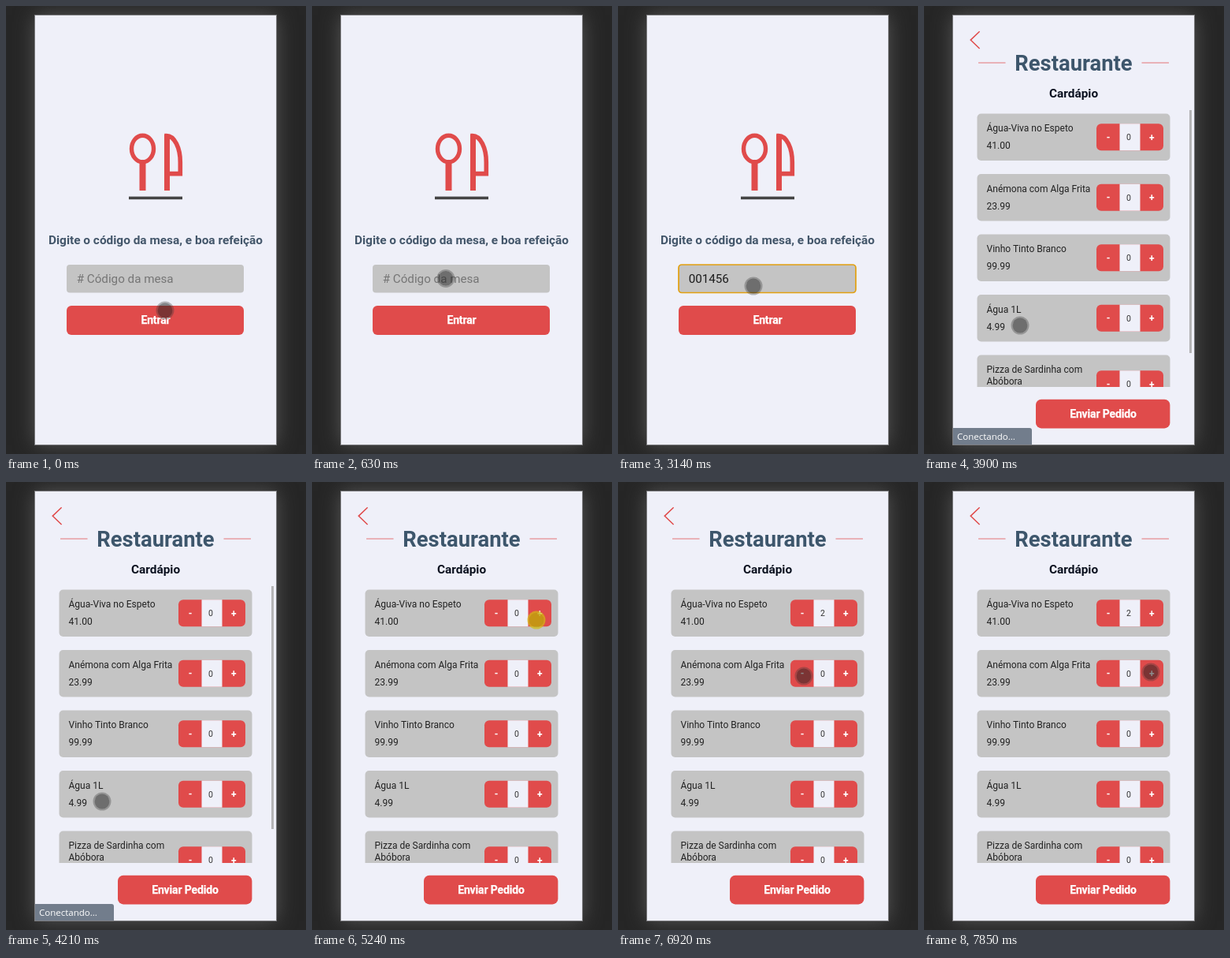
Write an HTML page that moves like this. It is 381x568 px and loops after 8 s.

```html
<!DOCTYPE html>
<html lang="pt">
<head>
<meta charset="utf-8">
<style>
  html, body { margin: 0; width: 100%; height: 100%; overflow: hidden; background: #262626; }
  #phone { position: absolute; left: 37px; top: 12px; width: 306px; height: 544px;
           background: #eff0f9; box-shadow: 0 0 0 1px #7d7d80, 0 0 24px #585858; }
  svg { position: absolute; left: 0; top: 0; font-family: Roboto, sans-serif; }
  .red { fill: #e04b4b; }
  .line { fill: none; stroke: #e04b4b; }
  .bold { font-weight: 700; }
  .mid { text-anchor: middle; }
  .btn { fill: #fff; stroke: #fff; stroke-width: .25; font-size: 14px; letter-spacing: -.15px; }
  .sign { fill: #fff; font-size: 12px; }
  .item { fill: #222; font-size: 12px; }
  .qty { fill: #333; font-size: 10.5px; }
  .entry { font-size: 15.2px; }
</style>
</head>
<body>
<div id="phone"></div>
<svg width="381" height="568" viewBox="0 0 381 568">
  <g id="login">
    <g class="line" stroke-width="5.4">
      <ellipse cx="173.5" cy="181" rx="14" ry="16.8"/>
      <path d="M173.5 198V234" stroke-width="8"/>
      <path d="M204 234V164.600C214 164.600 221.300 180 221.300 198V212.600H206" stroke-width="5.6"/>
      <path d="M204.500 163V234" stroke-width="7"/>
    </g>
    <rect x="156" y="241.6" width="68" height="3.6" fill="#444"/>
    <text class="bold mid" x="190" y="302" font-size="15.4" fill="#43566a">Digite o código da mesa, e boa refeição</text>
    <rect id="field" x="77" y="328" width="225" height="35.5" rx="4" fill="#c4c4c4" stroke-width="1.7"/>
    <text id="entry" class="entry" x="89.7" y="351"></text>
    <rect id="caret" y="337" width="1" height="17" fill="#222"/>
    <rect class="red" x="77" y="380" width="225" height="37" rx="6"/>
    <text class="btn bold mid" x="190" y="403">Entrar</text>
  </g>
  <g id="menu">
    <path class="line" stroke-width="1.5" d="M70.6 32.3L59.2 43.1L70.6 54"/>
    <path class="line" stroke-width="1.2" opacity=".75" d="M69 72H103.5M276.5 72H311"/>
    <text class="bold mid" x="190" y="82.4" font-size="27.4" fill="#3d566c">Restaurante</text>
    <text class="bold mid" x="190" y="116" font-size="15.4" fill="#0c1220">Cardápio</text>
    <clipPath id="view"><rect x="37" y="132" width="306" height="351"/></clipPath>
    <g id="list" clip-path="url(#view)"></g>
    <rect id="bar" x="337" y="132" width="3" height="308" fill="#b4b4b6"/>
    <rect class="red" x="142" y="498.8" width="170.4" height="36.6" rx="7"/>
    <text class="btn bold mid" x="227.5" y="522">Enviar Pedido</text>
  </g>
  <g id="status">
    <path d="M37 535H134Q137 535 137 538V556H37Z" fill="#727d8c"/>
    <text x="42" y="550" fill="#fff" font-size="11.5" font-weight="500" font-family="Open Sans, sans-serif">Conectando...</text>
  </g>
  <g id="cursor">
    <circle id="dot" r="9.4"/>
    <circle id="ring" r="10.4" fill="none" stroke-width="2.2"/>
  </g>
</svg>
<script>
const LOOP = 8000;
const $ = id => document.getElementById(id);
const set = (id, name, value) => $(id).setAttribute(name, value);
const ramp = (t, from, to) => Math.min(1, Math.max(0, (t - from) / (to - from)));
const ease = k => k * k * (3 - 2 * k);

const dishes = [
  ['41.00', 'Água-Viva no Espeto'],
  ['23.99', 'Anémona com Alga Frita'],
  ['99.99', 'Vinho Tinto Branco'],
  ['4.99', 'Água 1L'],
  ['', 'Pizza de Sardinha com', 'Abóbora']
];

function card([price, ...lines], i) {
  const extra = (lines.length - 1) * 14;
  const mid = 29.7 + extra / 2;
  const text = (cls, x, y, s) => `<text class="${cls}" x="${x}" y="${y}">${s}</text>`;
  return `<g transform="translate(0 ${136.5 + i * 76.5})">
    <rect x="67.5" width="245" height="${59.5 + extra}" rx="5" fill="#c4c4c4"/>
    ${lines.map((s, n) => text('item', 79.5, 22.5 + n * 15, s)).join('')}
    ${text('item', 79.5, 44.5 + extra, price)}
    <rect class="red" x="219" y="${mid - 17}" width="85" height="34" rx="6"/>
    <rect x="248.5" y="${mid - 17}" width="26" height="34" fill="#eff0f9"/>
    ${text('sign bold mid', 234, mid + 4.5, '-')}
    ${text('qty mid', 260, mid + 3.8, 0)}
    ${text('sign bold mid', 289.3, mid + 4.5, '+')}
  </g>`;
}
$('list').innerHTML = dishes.map(card).join('');
const firstQty = document.querySelector('.qty');

// Pointer glides: start, end, x, y
const glides = [
  [55, 130, 164, 319],
  [300, 800, 172, 355],
  [3290, 3450, 122, 405],
  [4250, 5060, 285, 175],
  [5690, 6560, 236, 246],
  [7390, 7850, 288, 241]
];
const presses = [970, 3600, 5240, 5460, 6850, 7000];

const pointer = t => glides.reduce(([x, y], [from, to, x1, y1]) => {
  const k = ease(ramp(t, from, to));
  return [x + (x1 - x) * k, y + (y1 - y) * k];
}, [202, 386]);

function draw(t) {
  const inMenu = t >= 3830;
  set('login', 'opacity', +!inMenu);
  set('menu', 'opacity', +inMenu);
  set('bar', 'opacity', 1 - ramp(t, 4600, 4830));
  set('status', 'opacity', t < 3680 ? 0 : 1 - ramp(t, 4400, 4560));

  const typed = '001456'.slice(0, Math.max(0, Math.ceil((t - 1809) / 185)));
  $('entry').textContent = typed || '# Código da mesa';
  set('entry', 'fill', typed ? '#1c1c1c' : '#757575');
  set('field', 'stroke', t >= 970 && t < 3600 ? '#e2a010' : 'none');
  set('caret', 'x', 89.7 + typed.length * 8.53);
  set('caret', 'opacity', +(typed ? t < 3140 : t >= 1050 && t < 1580));
  firstQty.textContent = (t >= 5290) + (t >= 5540);

  const down = presses.some(p => t >= p && t < p + 70);
  set('dot', 'fill', down ? 'rgba(190,165,10,.82)' : 'rgba(30,30,30,.52)');
  set('ring', 'stroke', down ? 'rgba(210,190,15,.7)' : 'rgba(60,60,60,.34)');
  set('cursor', 'transform', `translate(${pointer(t)})`);
}

function tick() {
  draw(performance.now() % LOOP);
  requestAnimationFrame(tick);
}
tick();
</script>
</body>
</html>
```
